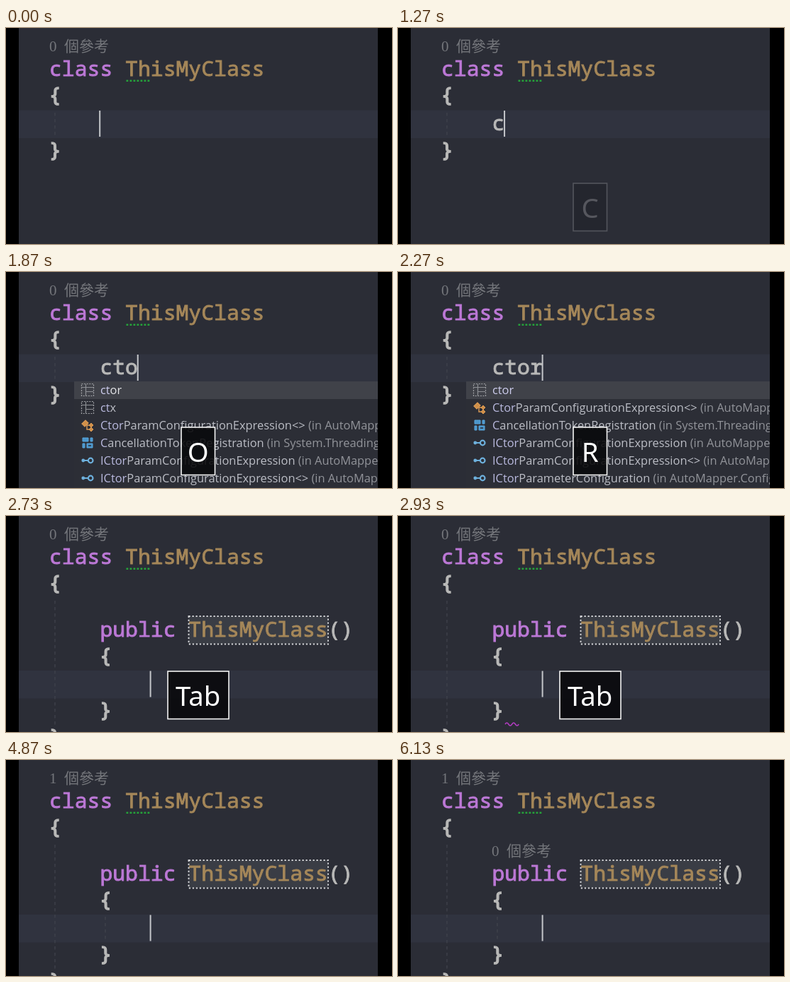
Animation of 544 by 306 pixels, one loop 6190 ms. Source, as an HTML page:

```html
<!DOCTYPE html>
<html lang="zh-Hant">
<head>
<meta charset="utf-8">
<title>Constructor snippet</title>
<style>
  html, body { margin: 0; width: 100%; height: 100%; overflow: hidden; background: #000; }
  svg { display: block; width: 544px; height: 306px; }
  text { white-space: pre; }
  .code { font: 500 29.75px "Noto Sans Mono", "DejaVu Sans Mono", monospace;
    fill: currentColor; stroke: currentColor; stroke-width: .9px; }
  .brace { stroke-width: 1.5px; }
  .lens { font: 300 21px "Noto Sans CJK TC", "Noto Sans CJK", sans-serif; fill: #74767b; }
  .num { font: 21px "Liberation Serif", serif; fill: #74767b; }
  .item { font: 16.4px "Open Sans", "Noto Sans", sans-serif; fill: #bcbec6; }
  .key { font: 38.3px "Noto Sans", "Open Sans", sans-serif; fill: #fff; text-anchor: middle; }
</style>
</head>
<body>
<svg id="stage" viewBox="0 0 544 306"></svg>
<script>
const NS = "http://www.w3.org/2000/svg";
const LOOP = 6190, FRAME = 200 / 3;
const LEFT = 61, CHAR = 17.85;
const KEYWORD = "#bc78d6", TYPE = "#a58759", PLAIN = "#b8b8b7";
const stage = document.getElementById("stage");

function el(tag, attrs = {}, parent = stage, content) {
  const node = document.createElementNS(NS, tag);
  for (const name in attrs) node.setAttribute(name, attrs[name]);
  if (content !== undefined) node.textContent = content;
  parent.appendChild(node);
  return node;
}
const group = (parent = stage) => el("g", {}, parent);
const rect = (x, y, width, height, fill, parent) => el("rect", { x, y, width, height, fill }, parent);
const path = (d, stroke, width, parent, more = {}) =>
  el("path", { d, stroke, "stroke-width": width, fill: "none", ...more }, parent);
const code = (col, y, str, color, parent) =>
  el("text", { x: LEFT + col * CHAR, y, class: "code", color }, parent, str);
const brace = (col, y, str, parent) =>
  el("text", { x: LEFT + col * CHAR - .8, y: y - 1.3, class: "code brace", color: PLAIN }, parent, str);
const show = (node, on) => node.setAttribute("visibility", on ? "inherit" : "hidden");
const fade = (node, a) => node.setAttribute("opacity", Math.max(0, Math.min(1, a)));

function squiggle(x, y, color, parent) {
  path(`M${x} ${y}q2.4 -4 4.8 0t4.8 0t4.8 0t4.8 0`, color, 1.5, parent);
}
function guide(x, y1, y2, parent) {
  return path(`M${x} ${y1}V${y2}`, "#42454e", 1.2, parent, { "stroke-dasharray": "4.5 4.5" });
}
function lens(x, y, digit, parent) {
  const num = el("text", { x, y, class: "num" }, parent, digit);
  el("text", { x: x + 21, y, class: "lens" }, parent, "個參考");
  return num;
}

// Editor
rect(18, 0, 506, 306, "#2b2d36");
const band = rect(18, 116.5, 506, 39.5, "#30333f");
const outerGuide = guide(69, 120, 154);
const count = lens(61, 32.5, "0");
code(0, 68, "class", KEYWORD);
code(6, 68, "ThisMyClass", TYPE);
path("M169.5 74.8H203", "#25a43a", 2.6, stage, { "stroke-dasharray": "2.8 2.2" });
brace(0, 106, "{");

// Before expansion
const before = group();
brace(0, 184, "}", before);
const typed = code(4, 145, "", PLAIN, before);
const typo = group(before);
squiggle(150, 152.5, "#e04545", typo);

// After expansion
const after = group();
rect(257, 142, 197, 39.5, "#3a3d45", after);
code(4, 170.5, "public", KEYWORD, after);
code(11, 170.5, "ThisMyClass", TYPE, after);
code(22, 170.5, "()", PLAIN, after);
el("rect", { x: 257.5, y: 142, width: 196.5, height: 39.5, fill: "none", stroke: "#d4d5d8",
  "stroke-width": 1.9, "stroke-dasharray": "2.2 2.8" }, after);
brace(4, 209, "{", after);
brace(4, 286, "}", after);
brace(0, 324.5, "}", after);
const innerGuide = guide(140, 222, 256, after);
const warn = group(after);
squiggle(151, 295, "#b23cc0", warn);
const innerLens = group(after);
lens(132, 136, "0", innerLens);

const caret = rect(131.2, 117, 2, 37, "#c4c6ca");

// Completion icons, drawn around their centre
const icons = {
  snippet(g) {
    el("rect", { x: -8.5, y: -8.5, width: 17, height: 17, fill: "none", stroke: "#a2a4a8",
      "stroke-width": 1.2, "stroke-dasharray": "2 1.6" }, g);
    path("M-8 -3.5H8M-2.5 -8V8M-2.5 2.5H8", "#8d8f94", 1.2, g);
  },
  keyword(g) {
    el("circle", { r: 9.2, fill: "#bfc0c2" }, g);
    el("circle", { cx: -3, r: 2.6, fill: "none", stroke: "#303239", "stroke-width": 2 }, g);
    path("M0 0H7M3.5 0V3M6 0V3", "#303239", 1.8, g);
  },
  class(g) {
    path("M-8 -2L-3 -7L1 -3L-4 2Z", "#d99a55", 1.2, g, { fill: "#d08f48" });
    path("M5 -3L8 0L5 3L2 0ZM5 3L8 6L5 9L2 6Z", "#d99a55", 1, g, { fill: "#d08f48" });
    path("M-1 -1V6H3M-1 0H3", "#d99a55", 1.4, g);
  },
  struct(g) {
    path("M-7 -7H1V-2H-7ZM4 -7H7V-2H4ZM-7 1H-4V7H-7ZM-1 1H7V7H-1Z", "#58a6dc", 1, g, { fill: "#4a95cb" });
    path("M1 4H5", "#2b2d36", 1.5, g);
  },
  interface(g) {
    el("circle", { cx: 4.2, r: 3.3, fill: "none", stroke: "#6db0dc", "stroke-width": 2.2 }, g);
    el("circle", { cx: -6.2, r: 2.4, fill: "#6db0dc" }, g);
    path("M-6 0H1", "#6db0dc", 2, g);
  }
};

const clip = el("clipPath", { id: "edge" });
rect(18, 0, 506, 306, "#000", clip);
const popups = el("g", { "clip-path": "url(#edge)" });

// Each row: icon, matched part, rest, dim namespace, right-hand note
function popup(right, rows) {
  const g = group(popups);
  rect(96, 155, right - 96, 151, "#2c2e36", g);
  rect(96, 155, right - 96, 25, "#404249", g);
  rows.forEach(([icon, match, rest, from = "", note], i) => {
    const mid = 167 + i * 25, y = mid + 5.8;
    icons[icon](el("g", { transform: `translate(115 ${mid})` }, g));
    const line = el("text", { x: 133, y, class: "item" }, g);
    if (i === 0) line.style.fill = "#e2e3e6";
    el("tspan", { fill: i ? "#b9b9de" : "#ccccec" }, line, match);
    el("tspan", {}, line, rest);
    el("tspan", { fill: "#92949a" }, line, from);
    if (note) el("text", { x: 450, y, class: "item", "text-anchor": "end" }, g, note);
  });
  return g;
}

const param = "ParamConfigurationExpression";
const mapper = " (in AutoMapper)";
const tail = [
  ["class", "Ctor", param + "<>", mapper],
  ["struct", "C", "ancellationTokenRegistration", " (in System.Threading)"],
  ["interface", "ICtor", param, mapper],
  ["interface", "ICtor", param + "<>", mapper],
  ["interface", "ICtor", "ParameterConfiguration", " (in AutoMapper.Configuration)"]
];
const firstList = popup(461, [
  ["snippet", "c", "lass"],
  ["keyword", "c", "har"],
  ["keyword", "c", "onst"],
  ["snippet", "c", "tor", "", "Constructor"],
  ["snippet", "c", "tx", "", "Current file context"],
  ["class", "C", "LSCompliantAttribute"]
]);
rect(455, 180, 6, 43, "#4c4e56", firstList);
const secondList = popup(524, [["snippet", "ct", "or"], ["snippet", "ct", "x"], ...tail.slice(0, 4)]);
const finalList = popup(524, [["snippet", "ctor", ""], ...tail]);

// Pressed key
const keyBox = group();
const keyFrame = el("rect", { x: 247, y: 220, width: 47.5, height: 67.5, fill: "#08080b",
  "fill-opacity": .88, stroke: "#f4f4f4", "stroke-width": 1.6 }, keyBox);
const keyText = el("text", { x: 270.7, y: 269.3, class: "key" }, keyBox);

// Typing steps: frame, typed text, key
const steps = [[0, "", ""], [19, "c", "C"], [25, "ct", "T"], [28, "cto", "O"], [33, "ctor", "R"], [39, "ctor", "Tab"]];
const caretGaps = [[3, 11], [49, 57], [65, 73], [81, 89]];

function draw(ms) {
  const n = Math.floor((ms + 5) / FRAME);
  const within = (a, b) => n >= a && n < b;
  const expanded = n >= 41;
  const [, text, key] = steps.filter(s => s[0] <= n).pop();

  show(before, !expanded);
  show(after, expanded);
  typed.textContent = text;
  const wrong = within(23, 25);
  typed.setAttribute("color", wrong ? "#e64646" : PLAIN);
  show(typo, wrong);

  band.setAttribute("y", expanded ? 219 : 116.5);
  outerGuide.setAttribute("d", `M69 120V${expanded ? 297 : 154}`);
  caret.setAttribute("x", LEFT + (expanded ? 8 : 4 + text.length) * CHAR - 1.2);
  caret.setAttribute("y", expanded ? 219.5 : 117);
  show(caret, !caretGaps.some(([a, b]) => within(a, b)));

  show(firstList, within(21, 26));
  show(secondList, within(26, 29));
  show(finalList, within(29, 39));

  const wide = key === "Tab";
  keyText.textContent = key;
  keyFrame.setAttribute("x", wide ? 228 : 247);
  keyFrame.setAttribute("width", wide ? 86 : 47.5);
  fade(keyBox, n < 23 ? (n - 18) / 5 : n < 57 ? 1 : n < 60 ? 1 - (n - 56) * .24 : 0);

  count.textContent = n < 48 ? "0" : "1";
  show(warn, within(44, 48));
  show(innerGuide, n >= 60);
  fade(innerLens, (n - 73) / 15);
}

const start = performance.now();
function tick() {
  draw((performance.now() - start) % LOOP);
  requestAnimationFrame(tick);
}
tick();
</script>
</body>
</html>
```
